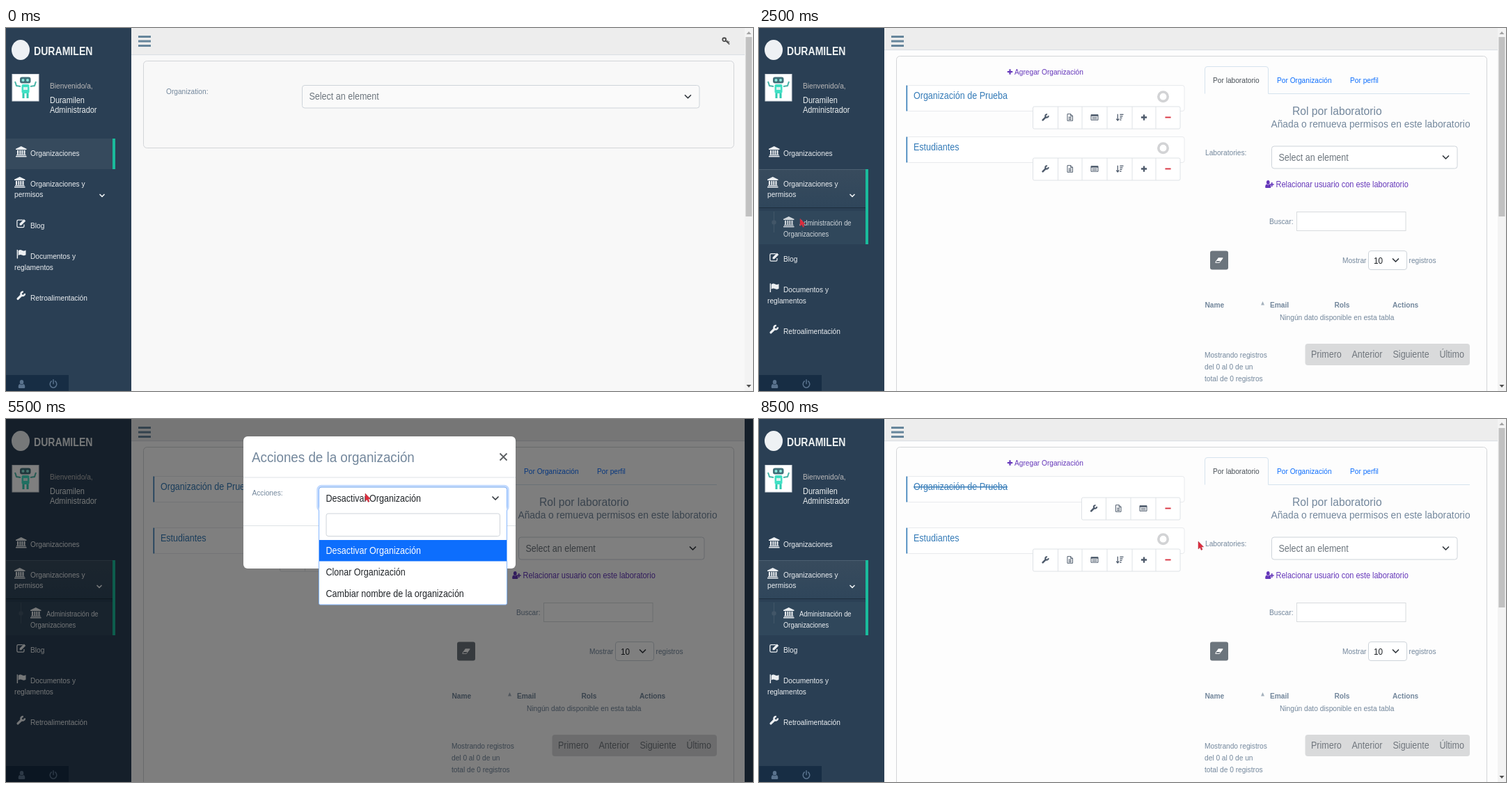
Recreate the animation shown at these times as an HTML page. Size 1073x522 px, loop 9 s.

```html
<!DOCTYPE html>
<html lang="es">
<head>
<meta charset="utf-8">
<title>Acciones de la organización</title>
<style>
html, body { margin: 0; width: 100%; height: 100%; overflow: hidden; background: #2a3f54; }
svg { display: block; width: 100%; height: 100%; font-family: "Liberation Sans", Arial, sans-serif; }
text { white-space: pre; }
</style>
</head>
<body>
<svg id="stage" viewBox="0 0 1073 522" preserveAspectRatio="none"></svg>
<script>
const LOOP = 9000;
const GREY = '#73879c', BLUE = '#0d6efd', LINK = '#337ab7', PURPLE = '#6537ba', DARK = '#4d5a6b', INK = '#212529', RED = '#d9303e';
const LIGHT = '#eceff2', DIM = '#d0d6db';

// The page is shown at .7826 by .868 of its layout size, text included.
const text = (x, y, s, size = 13, fill = GREY, more = '') =>
  `<text transform="translate(${x} ${y}) scale(.7826 .868)" font-size="${size}" fill="${fill}" ${more}>${s}</text>`;
const box = (x, y, x2, y2, fill, line = 'none', r = 0, more = '') =>
  `<rect x="${x}" y="${y}" width="${x2 - x}" height="${y2 - y}" rx="${r}" fill="${fill}" stroke="${line}" ${more}/>`;
const line = (d, color, w = 1, more = '') =>
  `<path d="${d}" fill="none" stroke="${color}" stroke-width="${w}" ${more}/>`;
const layer = (id, ...parts) => `<g id="${id}">${parts.join('')}</g>`;
const chevron = (x, y, color = '#343a40', s = 4) =>
  line(`M${x - s} ${y - s / 2}l${s} ${s} ${s}-${s}`, color, 1.7, 'stroke-linecap="round" stroke-linejoin="round"');

// Icons live in a 16 by 16 box.
const fill = d => `<path d="${d}" fill="currentColor"/>`;
const draw = (d, w, more) => line(d, 'currentColor', w, more);
const icons = {
  bank: fill('M8 0L16 3.8V5.2H0V3.8ZM2 6H4.2V12H2ZM5.5 6H7.5V12H5.5ZM8.6 6H10.6V12H8.6ZM11.8 6H14V12H11.8ZM1 12.5H15V13.8H1ZM0 14.4H16V16H0Z'),
  edit: draw('M11 2.5H3Q1 2.5 1 4.5V13Q1 15 3 15H11Q13 15 13 13V10', 1.5) + fill('M5.5 11.5V8.6L12.8 1.3 15.7 4.2 8.4 11.5Z'),
  flag: draw('M1.6 1V16', 1.7) + fill('M3.2 2.6Q6.5 .2 9.5 2T16 1.8V9.8Q12.5 11.8 9.5 10.2T3.2 10.7Z'),
  wrench: draw('M2.4 13.6L8.6 7.4', 3.8, 'stroke-linecap="round"') + draw('M11.6 2A3.2 3.2 0 1 0 14 4.6', 3),
  user: fill('M8 0A4 4.3 0 0 1 8 8.6 4 4.3 0 0 1 8 0ZM4 8Q8 11 12 8 15 9 15 14 15 16 13 16H3Q1 16 1 14 1 9 4 8Z'),
  power: draw('M4.4 3A6.3 6.3 0 1 0 11.6 3M8 .5V7.5', 2, 'stroke-linecap="round"'),
  key: '<circle cx="5" cy="5.5" r="3.2" fill="none" stroke="currentColor" stroke-width="2.4"/>' + draw('M7.5 7.5L15 14.5M12 12L14.5 9.5M9.8 10L12 7.8', 2),
  file: draw('M2.5 1H9.5L13.5 5V15H2.5ZM9.3 1V5.2H13.5M5 7.5H11M5 10H11M5 12.5H11', 1.4),
  card: draw('M.7 2.5H15.3V13.5H.7Z', 1.4) + fill('M.7 2.5H15.3V5.6H.7Z') + draw('M3 8H13M3 10.8H13', 1.3),
  sort: draw('M4 1V14M1 11L4 14.5 7 11', 1.8) + draw('M8.5 2H16M8.5 5.7H14.5M8.5 9.4H13M8.5 13.1H11.5', 1.9),
  plus: draw('M8 2V14M2 8H14', 3.4),
  minus: draw('M1.5 8H14.5', 3),
  eraser: fill('M6.5 3H15.5L11 9.2H2Z') + draw('M2.4 9L1 12.5H8.5L14.8 4', 1.3)
};
const icon = (name, x, y, w, color = 'currentColor', h = w) =>
  `<g transform="translate(${x} ${y}) scale(${w / 16} ${h / 16})" color="${color}">${icons[name]}</g>`;
const midIcon = (name, cx, cy, w, color) => icon(name, cx - w / 2, cy - w / 2, w, color);

const item = (name, y, label, second, secondY) =>
  icon(name, name === 'bank' ? 12 : 15, y - 13.5, name === 'bank' ? 15.5 : 13.5) + text(35, y, label, 13, 'currentColor') +
  (second ? text(12, secondY, second, 13, 'currentColor') : '');

const robot = box(9, 66.5, 47, 105, '#fff', '#d5dbe0') +
  line('M21 84L15 83 13 77M35 84L41 83 43 77', '#48b5a8', 2) +
  line('M25 94V101M31 94V101', '#2fc9b0', 3) +
  box(20, 70.5, 35.5, 79.5, '#41717a', 'none', 3) + box(22.5, 81, 33.5, 94, '#3fe0c4', 'none', 2) +
  '<circle cx="24.5" cy="75" r="2" fill="#8be8dc"/><circle cx="31" cy="75" r="2" fill="#8be8dc"/>' +
  box(25, 85, 31, 89, '#d8f3ee');

const sidebar = [
  box(0, 0, 180, 522, '#2a3f54'),
  '<ellipse cx="21" cy="31.5" rx="13" ry="14.5" fill="#eef1f4"/>',
  text(40, 39, 'DURAMILEN', 18, '#ecf0f1', 'font-weight="700"'),
  robot,
  text(63, 87, 'Bienvenido/a,', 13, '#bab8b8'),
  text(63, 107.5, 'Duramilen', 14, '#ecf0f1'),
  text(63, 122, 'Administrador', 14, '#ecf0f1'),
  layer('active1', box(0, 159, 153, 203, '#364a5d'), box(153, 159, 157, 203, '#1abb9c')),
  layer('active2', box(0, 203, 153, 311, '#30475b'), box(0, 203, 153, 259, 'url(#act)'),
    line('M0 203.5H153', '#4d6072'), line('M0 258.5H153', '#1d2d3d'), box(0, 259, 153, 263, '#2b4055'),
    box(153, 203, 157, 311, '#1abb9c'),
    line('M21.5 264V294', '#425668'), '<circle cx="21.5" cy="279.5" r="3.2" fill="#425668"/>'),
  `<g color="${LIGHT}">`,
  icon('bank', 14, 170, 15.5), text(35, 183.5, 'Organizaciones', 13, 'currentColor'),
  layer('parent', item('bank', 227.5, 'Organizaciones y', 'permisos', 243)),
  layer('closedArrow', chevron(138, 241, LIGHT, 3)),
  layer('openArrow', chevron(134, 241, LIGHT, 3)),
  layer('child', icon('bank', 35, 271, 15.5), text(58, 284, 'Administración de', 12, 'currentColor'),
    text(35, 299.5, 'Organizaciones', 12, 'currentColor')),
  layer('rest', item('edit', 287.5, 'Blog'), item('flag', 331.5, 'Documentos y', 'reglamentos', 347.5),
    item('wrench', 391.5, 'Retroalimentación')),
  '</g>',
  box(0, 499, 90, 522, '#172d44'),
  icon('user', 17, 506, 11, '#5a738e', 12), icon('power', 62, 505.5, 12, '#5a738e', 13)
].join('');

const frame = (head, bg, top) =>
  box(180, 0, 1061, 522, bg) + box(180, 0, 1061, head, '#ededed') +
  line(`M180 ${head + .5}H1061`, '#d9dee4') +
  box(197.5, top, 1045.5, top === 47.5 ? 172.5 : 540, bg, '#d3d5d8', 5) +
  line('M190 12.5H208M190 19H208M190 25.5H208', '#66859b', 3.2);

const select = (x, y, x2, y2, label, color, bg = '#fff') =>
  box(x, y, x2, y2, bg, '#ced4da', 3.5) + text(x + 10, (y + y2) / 2 + 4.6, label, 16, color) +
  chevron(x2 - 16.5, (y + y2) / 2);

const first = frame(38, '#f8f8f8', 47.5) + icon('key', 1028, 12.5, 12, '#4a4a4a') +
  text(230, 95, 'Organization:') + select(425.5, 82.5, 996, 115, 'Select an element', '#6c757d', '#fafafa');

const FULL = [393.5, 429.5, 464, 500, 536, 570, 605], SHORT = [463.5, 498.5, 534, 570, 605];
const row = (y, name, edges, names, more = '') => {
  const tools = names.map((n, i) => {
    const size = n === 'minus' ? 10 : 11;
    return (i ? line(`M${edges[i]} ${y + 31}V${y + 63}`, '#dee2e6') : '') +
      midIcon(n, (edges[i] + edges[i + 1]) / 2, y + 46.5, size, n === 'minus' ? RED : DARK);
  }).join('');
  return box(212.5, y + .5, 611, y + 37.5, '#fff', '#e8eaed', 3) +
    line(`M212.3 ${y + .5}V${y + 37.5}`, LINK, 1.6) +
    text(222, y + 20, name, 16, LINK, more) +
    (edges === FULL ? `<circle cx="580.5" cy="${y + 16.7}" r="6.7" fill="none" stroke="#d2d3d5" stroke-width="3.6"/>` : '') +
    box(edges[0], y + 31, 605, y + 63, '#fff', '#dee2e6', 2) + tools;
};
const ALL = ['wrench', 'file', 'card', 'sort', 'plus', 'minus'];

const second = [
  frame(31, '#fdfdfd', 40.5),
  midIcon('plus', 360.5, 63, 10, PURPLE), text(367, 67, 'Agregar Organización', 13, PURPLE),
  layer('rowOn', row(82, 'Organización de Prueba', FULL, ALL)),
  layer('rowOff', row(82, 'Organización de Prueba', SHORT, ['wrench', 'file', 'card', 'minus'], 'text-decoration="line-through"')),
  row(156, 'Estudiantes', FULL, ALL),
  layer('toolHover', midIcon('wrench', 411.5, 128.5, 11, '#0b50d8')),
  line('M640.5 94.5V59Q640.5 55.5 644 55.5H728Q731.5 55.5 731.5 59V94.5H1021', '#d5e3ee'),
  text(652, 79, 'Por laboratorio', 13, '#495057'),
  text(744, 79, 'Por Organización', 13, BLUE), text(849, 79, 'Por perfil', 13, BLUE),
  text(766, 124.5, 'Rol por laboratorio', 20), text(735.5, 142.7, 'Añada o remueva permisos en este laboratorio', 17.6),
  text(641, 182.5, 'Laboratories:'), select(736.5, 170, 1003, 202, 'Select an element', '#6c757d'),
  icon('user', 726.5, 219, 9.5, PURPLE, 11), midIcon('plus', 736.7, 225, 8, PURPLE),
  text(742.5, 229, 'Relacionar usuario con este laboratorio', 14, PURPLE),
  text(733, 282, 'Buscar:'), box(772.5, 264.5, 929, 291.5, '#fff', '#d8dbde'),
  box(648, 320.5, 674, 347.5, '#6c757d', 'none', 3), midIcon('eraser', 661, 334, 12, '#fff'),
  text(838, 338, 'Mostrar'), box(875.5, 320.5, 930.5, 347.5, '#fff', '#ced4da', 3.5),
  text(883, 338.5, '10', 15, INK), chevron(914.5, 334), text(933.5, 338, 'registros'),
  ...[[640.5, 'Name'], [734, 'Email'], [826.5, 'Rols'], [910, 'Actions']].map(([x, s]) => text(x, 402, s, 13, GREY, 'font-weight="700"')),
  '<path d="M721 398.5L723.5 393 726 398.5Z" fill="#a5b1bd"/>',
  text(748, 419.5, 'Ningún dato disponible en esta tabla'),
  text(640, 474, 'Mostrando registros'), text(640, 491, 'del 0 al 0 de un'), text(640, 507.5, 'total de 0 registros'),
  box(784.5, 454, 1021, 485, '#d9dadb', 'none', 4),
  ...[[793, 'Primero'], [851.5, 'Anterior'], [910.5, 'Siguiente'], [977.5, 'Último']].map(([x, s]) => text(x, 473.5, s, 16, '#70767d'))
].join('');

const scrollbar = layer('scroll', box(1061, 0, 1073, 522, '#f3f3f3'), box(1062.5, 13, 1071.5, 271, '#c1c1c1'),
  '<path d="M1063.5 9L1067 5 1070.5 9Z" fill="#a3a3a3"/><path d="M1063.5 513L1067 517 1070.5 513Z" fill="#505050"/>');

const modal = layer('modal',
  box(0, 0, 1073, 522, '#000', 'none', 0, 'opacity=".5"'),
  box(341, 25, 732, 215, '#fff', 'none', 6),
  text(353, 61.5, 'Acciones de la organización', 24),
  line('M709.5 49.5L719.5 59.5M719.5 49.5L709.5 59.5', '#5c5f62', 1.8),
  line('M341 84H732M341 153.5H732', '#dee2e6'),
  text(353.5, 110, 'Acciones:'),
  layer('glow', box(448, 96.5, 721, 131.5, 'none', '#c2dafe', 5, 'stroke-width="3.5"')),
  select(449.5, 98, 719.5, 130, 'Desactivar Organización', INK),
  layer('focus', box(449.5, 98, 719.5, 130, 'none', '#86b7fe', 3.5)),
  box(539, 168, 595, 201, '#7c7d7e', 'none', 3), text(549, 189, 'Cerrar', 16, '#fff'),
  box(601, 168, 719, 201, BLUE, 'none', 3),
  layer('saveHover', box(601, 168, 719, 201, '#0b5ed7', 'none', 3)),
  text(611.5, 189, 'Guardar cambios', 16, '#fff'),
  layer('drop', box(449.5, 130, 719.5, 267, '#fff', '#86b7fe', 2),
    box(450, 127, 719, 133, '#fff'),
    box(460, 136, 709.5, 168.5, '#fff', '#ced4da', 3), box(450, 174, 719, 204.5, BLUE),
    text(459.5, 193.5, 'Desactivar Organización', 16, '#fff'),
    text(459.5, 224.5, 'Clonar Organización', 16, INK),
    text(459.5, 255.5, 'Cambiar nombre de la organización', 16, INK)));

const cursorShape = '<path id="cursor" d="M0 0V11L2.5 8.8 4.2 12.5 6 11.7 4.4 8H7.6Z" fill="#e02b3c" stroke="#a33b48" stroke-width=".5"/>';

document.getElementById('stage').innerHTML =
  '<defs><linearGradient id="act" x2="0" y2="1"><stop stop-color="#384b5d"/><stop offset="1" stop-color="#2f465b"/></linearGradient></defs>' +
  box(0, 0, 1073, 522, '#2a3f54') + sidebar + layer('first', first) + layer('second', second) + scrollbar + modal + cursorShape;

const shown = {
  active1: [0, 2500], active2: [1000, LOOP], closedArrow: [0, 1000], openArrow: [1000, LOOP], child: [1000, LOOP],
  first: [0, 2500], second: [2500, LOOP], rowOn: [2500, 8500], rowOff: [8500, LOOP], toolHover: [3500, 4000],
  modal: [4000, 8500], glow: [5500, 8500], focus: [5500, 8500], drop: [5500, 7000], saveHover: [8000, 8500],
  cursor: [500, LOOP]
};
const hovered = { parent: [500, 2000], child: [2000, 3500] };
const stops = [[500, 59, 222], [2000, 59, 274], [3500, 402, 120], [5000, 516, 107], [6500, 516, 181], [8000, 631, 176]];

const node = id => document.getElementById(id);
const within = (t, [a, b]) => t >= a && t < b;

function update(t) {
  for (const id in shown) node(id).style.display = within(t, shown[id]) ? '' : 'none';
  for (const id in hovered) node(id).style.color = within(t, hovered[id]) ? DIM : LIGHT;
  node('scroll').style.display = within(t, shown.modal) ? 'none' : '';
  node('rest').setAttribute('transform', `translate(0 ${t >= 1000 ? 48.5 : 0})`);
  const at = stops.filter(s => s[0] <= t).pop();
  if (at) node('cursor').setAttribute('transform', `translate(${at[1]} ${at[2]})`);
}

const start = performance.now();
function tick() {
  update((performance.now() - start) % LOOP);
  requestAnimationFrame(tick);
}
tick();
</script>
</body>
</html>
```
